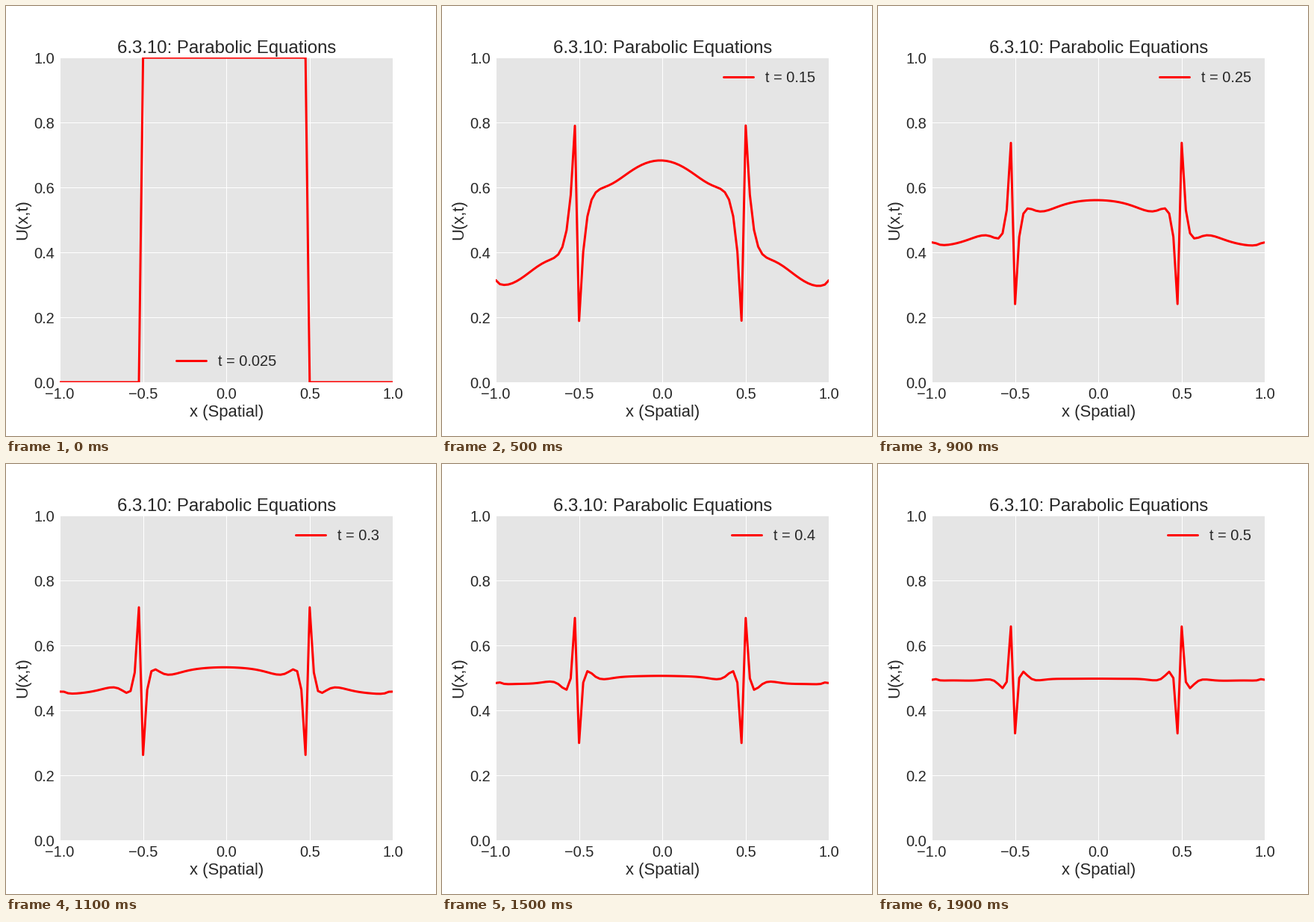
Recreate the animation shown at these times as a matplotlib script. Size 576 by 576 pixels, loop 2 s.

```python
import numpy as np
import matplotlib.pyplot as plt
from matplotlib.animation import FuncAnimation

FRAMES = 20
H = 1 / 40          # grid spacing
K = 0.025           # time step
MU = K / H**2
INK = "0.15"

plt.rcParams.update({
    "font.family": "Liberation Sans",
    "text.color": INK,
    "axes.labelcolor": INK,
    "xtick.color": INK,
    "ytick.color": INK,
    "lines.solid_capstyle": "round",
})


def edge_value(t):
    """Series solution of the heat equation at x = -1 and x = 1."""
    odd = 2 * np.arange(50) + 1
    signs = (-1.0) ** np.arange(50)
    return 0.5 - 2 * np.sum(signs * np.exp(-(np.pi * odd) ** 2 * t) / (np.pi * odd))


def solve(x):
    """Crank-Nicolson steps; edge values are refreshed after each solve."""
    n = len(x)
    lap = np.eye(n, k=1) + np.eye(n, k=-1) - 2 * np.eye(n)
    lap[[0, -1]] = 0
    implicit = np.eye(n) - MU / 2 * lap
    explicit = np.eye(n) + MU / 2 * lap
    u = np.where((x > -0.5 - H / 2) & (x < 0.5 - H / 2), 1.0, 0.0)
    states = [u]
    for step in range(1, FRAMES):
        u = np.linalg.solve(implicit, explicit @ u)
        u[[0, -1]] = edge_value(step * K)
        states.append(u)
    return states


x = np.linspace(-1, 1, 81)
states = solve(x)

fig = plt.figure(figsize=(8, 8), dpi=72, facecolor="white")
ax = fig.add_axes([0.125, 0.125, 0.775, 0.755], facecolor="#E5E5E5")
ax.set(xlim=(-1, 1), ylim=(0, 1),
       xticks=np.linspace(-1, 1, 5), yticks=np.linspace(0, 1, 6))
ax.set_axisbelow(True)
ax.grid(color="white", linewidth=1)
ax.spines[:].set_visible(False)
ax.tick_params(length=0, pad=7, labelsize=20)
ax.set_title("6.3.10: Parabolic Equations", fontsize=24, pad=6)
ax.set_xlabel("x (Spatial)", fontsize=22)
ax.set_ylabel("U(x,t)", fontsize=22)
line, = ax.plot(x, states[0], color="red", linewidth=3)


def draw(i):
    line.set_ydata(states[i])
    line.set_label(f"t = {(i + 1) * K:g}")
    ax.legend(loc="best", frameon=False, fontsize=20)
    return line,


anim = FuncAnimation(fig, draw, frames=FRAMES, interval=100, repeat=True)
plt.show()
```
